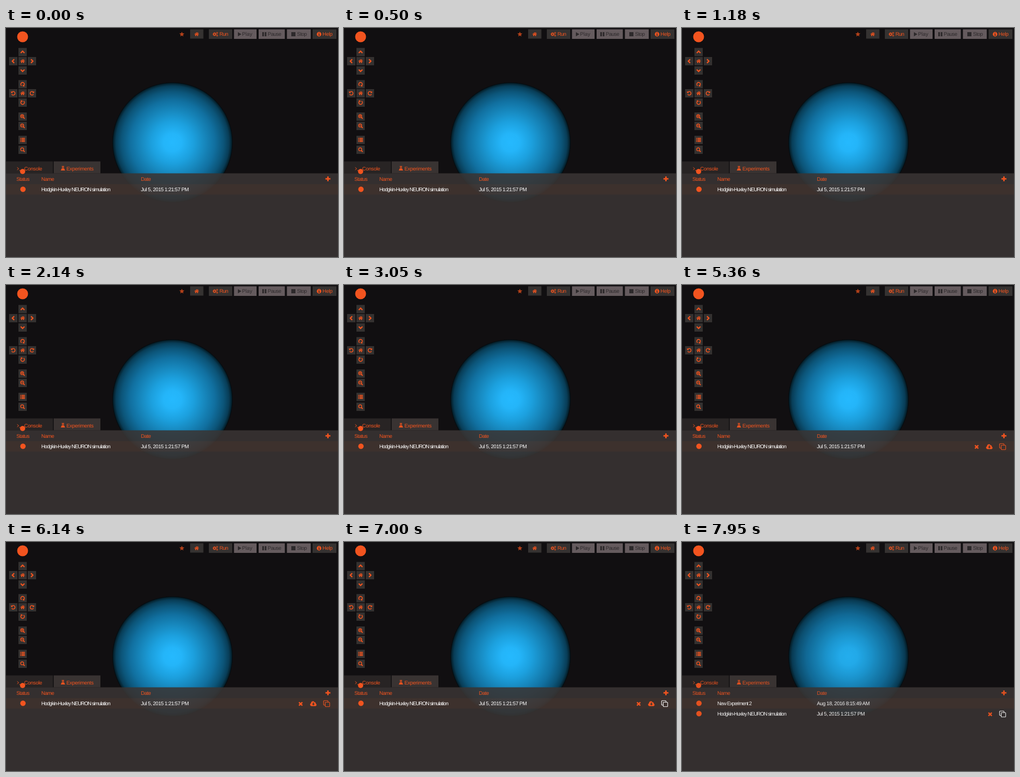
These frames come from a looping animation (640 px wide and 442 px high, 8000 ms). An HTML page:

```html
<!DOCTYPE html>
<html lang="en">
<head>
<meta charset="utf-8">
<title>Experiments panel</title>
<style>
  html, body { margin: 0; width: 100%; height: 100%; overflow: hidden; background: #110f11; }
  svg { display: block; width: 640px; height: 442px; font: 10px "Liberation Sans", Arial, sans-serif; }
  text { text-rendering: geometricPrecision; letter-spacing: -.3px; }
  .accent { color: #f2541f; fill: currentColor; }
  .off { color: #2d292b; fill: currentColor; }
  .line { fill: none; stroke: currentColor; stroke-width: 2; }
  .thin { stroke-width: 1.2; }
  .head text { letter-spacing: -.55px; }
  .name { letter-spacing: -1px; fill: #fff; }
  .date { letter-spacing: -.49px; fill: #fff; }

  .sphere, .dim, .row, .remove, .tools, .cloud, .copy, .added {
    animation: 8s step-end infinite;
  }
  .sphere, .dim { animation-name: dim; }
  .row { animation-name: shift-row; }
  .remove { animation-name: shift-icon; }
  .tools { animation-name: show-tools; }
  .cloud { animation-name: hide-cloud; }
  .copy { animation-name: hover-copy; }
  .added { animation-name: show-row; }

  @keyframes dim { 0% { opacity: 1 } 96.25%, 100% { opacity: .93 } }
  @keyframes shift-row { 0% { transform: none } 96.25%, 100% { transform: translateY(20px) } }
  @keyframes shift-icon { 0% { transform: none } 96.25%, 100% { transform: translateX(26px) } }
  @keyframes show-tools { 0% { opacity: 0 } 64.75%, 100% { opacity: 1 } }
  @keyframes hide-cloud { 0% { opacity: 1 } 96.25%, 100% { opacity: 0 } }
  @keyframes hover-copy { 0% { color: #f2541f } 77.5%, 100% { color: #fff } }
  @keyframes show-row { 0% { opacity: 0 } 96.25%, 100% { opacity: 1 } }
</style>
</head>
<body>
<svg viewBox="0 0 640 442">
  <defs>
    <radialGradient id="shade">
      <stop offset="0" stop-color="#25b9fe"/>
      <stop offset=".15" stop-color="#24b5f9"/>
      <stop offset=".35" stop-color="#1ca0de"/>
      <stop offset=".5" stop-color="#188cc3"/>
      <stop offset=".7" stop-color="#1170a0"/>
      <stop offset=".85" stop-color="#0c5579"/>
      <stop offset=".94" stop-color="#083d57"/>
      <stop offset=".98" stop-color="#052330"/>
      <stop offset="1" stop-color="#03070a"/>
    </radialGradient>
    <rect id="key" x="-8" y="-8" width="16" height="16" fill="#343130"/>
    <path id="chevron" class="line" d="M-3.6 1.800L0-1.800L3.600 1.800" style="stroke-width:2.300"/>
    <g id="home" transform="scale(.88)">
      <path class="line" d="M-4.600 .4L0-3.500L4.600 .4" style="stroke-width:1.300"/>
      <path d="M-3.200 .7L0-2L3.200 .7V4H.9V1.500H-.9V4H-3.200ZM2-4H3.300V-.8L2-2Z"/>
    </g>
    <g id="turn">
      <path class="line" d="M3.100 1.800A3.500 3.500 0 1 1 2.400-2.600" style="stroke-width:1.600"/>
      <path d="M4.300-4.300V-.4H.4Z"/>
    </g>
    <g id="lens">
      <circle class="line" cx="-.8" cy="-.8" r="2.900" style="stroke-width:1.400"/>
      <path class="line" d="M1.400 1.400L4 4"/>
    </g>
    <path id="minus" class="line thin" d="M-2.400-.8H.8"/>
    <path id="plus" class="line thin" d="M-2.400-.8H.8M-.8-2.400V.8"/>
    <path id="list" d="M-4.500-4h1.700v1.500h-1.700zM-2-4h6.500v1.500h-6.500zM-4.500-1.800h1.700v1.500h-1.700zM-2-1.800h6.500v1.500h-6.500zM-4.500 .4h1.700v1.500h-1.700zM-2 .4h6.500v1.500h-6.500zM-4.500 2.600h1.700v1.400h-1.700zM-2 2.600h6.500v1.400h-6.500z"/>
    <path id="star" d="M0-4.800L1.400-1.700L4.800-1.400L2.200 .9L3 4.200L0 2.500L-3 4.200L-2.200 .9L-4.800-1.400L-1.400-1.700Z"/>
    <g id="gear">
      <circle class="line" r="2" style="stroke-width:1.500"/>
      <circle class="line" r="3.100" style="stroke-width:1" stroke-dasharray="1.300 1.130"/>
    </g>
    <path id="cross" class="line" d="M-3.200-3.200L3.200 3.200M3.200-3.200L-3.200 3.200" style="stroke-width:2.600"/>
    <g id="sheets" class="line" style="stroke-width:1.100">
      <rect x="-2.600" y="-2.800" width="8.500" height="8.500" rx="1"/>
      <path d="M-2.600 2.800H-4.800Q-5.800 2.800-5.800 1.800V-4.800Q-5.800-5.800-4.800-5.800H1.700Q2.700-5.800 2.700-4.800V-2.800"/>
    </g>
    <path id="cloud" d="M-3.800 4.700A2.900 2.900 0 0 1-4.600-.8A3.700 3.700 0 0 1 2.300-2.800A2.300 2.300 0 0 1 4.600 .1A2.400 2.400 0 0 1 4 4.700Z"/>
  </defs>

  <rect width="640" height="442" fill="#110f11"/>
  <circle class="sphere" cx="321" cy="221" r="116" fill="url(#shade)"/>

  <g class="accent">
    <circle cx="32" cy="17" r="10.500"/>
    <g id="pad"></g>
  </g>

  <g fill="#353231">
    <path d="M355 2.500h25.500v18h-25.500zM391 2.500h45v18.500h-45zM591 2.500h46v18.500h-46z"/>
    <path fill="#655b5e" d="M439.500 2.500h43.500v18.500h-43.500zM487 2.500h50.500v18.500h-50.500zM541.500 2.500h46v18.500h-46z"/>
  </g>
  <g class="accent">
    <use href="#star" x="339" y="12" opacity=".72"/>
    <use href="#home" x="367.500" y="12"/>
    <use href="#gear" x="402" y="12"/>
    <g transform="translate(407 9.500) scale(.55)"><use href="#gear"/></g>
    <g transform="translate(407 14.500) scale(.55)"><use href="#gear"/></g>
    <text x="411.500" y="15.400" style="letter-spacing:-.6px">Run</text>
    <circle cx="603.500" cy="12" r="4.400"/>
    <path fill="#353231" d="M602.800 8.700h1.500v1.400h-1.500zM602.200 11h2.100v3h.7v1h-2.800v-1h.7v-2h-.7z"/>
    <text x="610" y="15.400">Help</text>
  </g>
  <g class="off">
    <path d="M447 8L453.800 12L447 16ZM494 8h3.200v8h-3.200zM498.800 8h3.200v8h-3.200zM550 8h8v8h-8z"/>
    <text x="455" y="15.400" style="letter-spacing:.1px">Play</text>
    <text x="504.500" y="15.400" style="letter-spacing:-.5px">Pause</text>
    <text x="561" y="15.400" style="letter-spacing:-.5px">Stop</text>
  </g>

  <path fill="#282424" d="M0 257.500h90.500v23h-90.500z"/>
  <path fill="#393332" d="M92 257.500h90v23h-90z"/>
  <rect y="280.500" width="640" height="161.500" fill="#3a3534" opacity=".88"/>
  <rect y="301.500" width="640" height="20" fill="#f2541f" opacity=".05"/>

  <g class="accent dim">
    <path class="line" d="M21.500 269L24.500 271.500L21.500 274M25.500 275H30" style="stroke-width:1"/>
    <circle cx="32" cy="277" r="5"/>
    <text x="35" y="274.500">Console</text>
    <path class="line thin" d="M107.500 267H112M108.700 267V270.500L106.500 274.500H113L110.800 270.500V267"/>
    <path d="M107.800 271.500H111.700L113 274.500H106.500Z"/>
    <text x="116.500" y="274.500">Experiments</text>
    <g class="head">
      <text x="20" y="295">Status</text>
      <text x="68" y="295">Name</text>
      <text x="260" y="295">Date</text>
    </g>
    <path d="M619.200 286.500h2.800v3.200h3.400v2.800h-3.400v3.300h-2.800v-3.300h-3.400v-2.800h3.400z"/>

    <g class="added">
      <circle cx="32.700" cy="311.300" r="5.200"/>
      <text class="name" x="68" y="314.700">New Experiment 2</text>
      <text class="date" x="260" y="314.700">Aug 18, 2016 8:15:49 AM</text>
    </g>
    <g class="row">
      <circle cx="32.700" cy="311.300" r="5.200"/>
      <text class="name" x="68" y="314.700">Hodgkin-Huxley NEURON simulation</text>
      <text class="date" x="260" y="314.700">Jul 5, 2015 1:21:57 PM</text>
      <g class="tools">
        <g class="remove"><use href="#cross" x="568" y="312.500"/></g>
        <g class="cloud">
          <use href="#cloud" x="592.500" y="312"/>
          <path fill="#42352f" d="M591.600 309.800h1.900v2.600h1.800l-2.750 3l-2.750-3h1.800z"/>
        </g>
        <g class="copy"><use href="#sheets" x="618" y="312"/></g>
      </g>
    </g>
  </g>
</svg>
<script>
  const pad = document.getElementById('pad');
  const addKey = (x, y, icon, transform = '') => {
    const marks = icon.split(' ').map(id => `<use href="#${id}"/>`).join('');
    pad.innerHTML += `<g transform="translate(${x} ${y})"><use href="#key"/><g transform="${transform}">${marks}</g></g>`;
  };
  addKey(32, 46.5, 'chevron');
  addKey(14, 64, 'chevron', 'rotate(-90)');
  addKey(32, 64, 'home');
  addKey(50, 64, 'chevron', 'rotate(90)');
  addKey(32, 82, 'chevron', 'rotate(180)');
  addKey(32, 108.5, 'turn', 'rotate(90)');
  addKey(14, 126, 'turn', 'scale(-1 1)');
  addKey(32, 126, 'home');
  addKey(50, 126, 'turn');
  addKey(32, 144, 'turn', 'rotate(-90)');
  addKey(32, 171, 'lens plus');
  addKey(32, 189, 'lens minus');
  addKey(32, 216, 'list');
  addKey(32, 235, 'lens');
</script>
</body>
</html>
```
